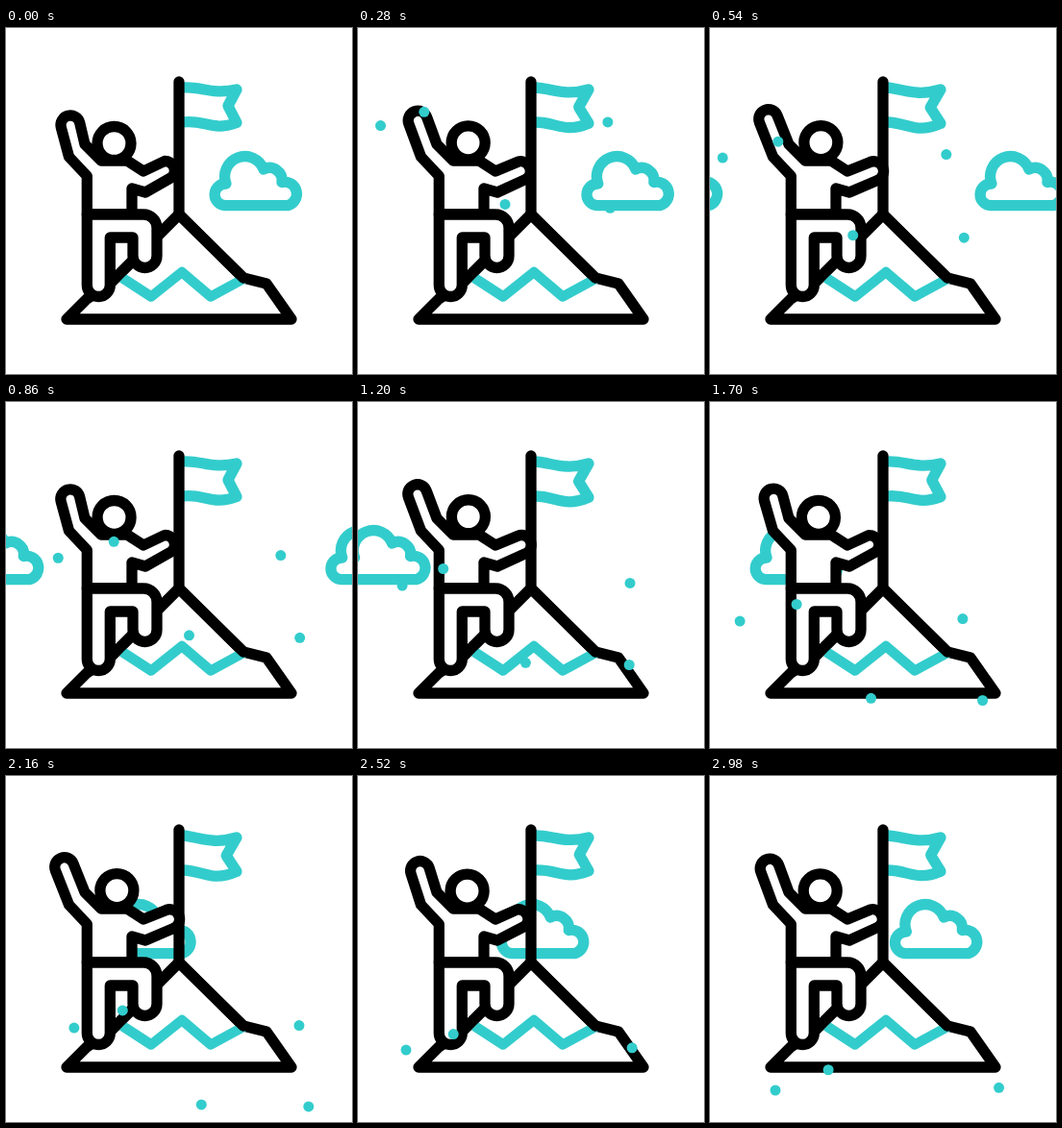
An HTML page that plays this animation: 360x360 px, repeating every 3 s.

```html
<!DOCTYPE html>
<html lang="en">
<head>
<meta charset="utf-8">
<title>Summit</title>
<style>
  html, body { margin: 0; width: 100%; height: 100%; overflow: hidden; background: #fff; }
  svg { display: block; width: 100%; height: 100%; }
  g { stroke-width: 11.3; stroke-linecap: round; stroke-linejoin: round; }
  .teal { fill: none; stroke: #33cccc; }
  .ink { fill: #fff; stroke: #000; }
  #dots { fill: #33cccc; }
</style>
</head>
<body>
<svg viewBox="0 0 360 360">
  <defs>
    <path id="cloud" d="M228 184.7A11.3 11.3 0 0 1 229 162A20.5 20.5 0 0 1 268 147A13 13 0 0 1 287 160.5A12.2 12.2 0 0 1 293 184.7Z"/>
  </defs>
  <g class="teal">
    <use id="leaving" href="#cloud"/>
    <use id="coming" href="#cloud"/>
    <path id="flag"/>
  </g>
  <g class="ink">
    <path d="M63 303H297L271 266L247 260L180 194L108 266L84 282Z"/>
    <path d="M180 56V194"/>
  </g>
  <g class="teal">
    <path stroke-width="10.5" stroke-linecap="butt" d="M121 260L151 279.5L183 254L213 279.5L247 261"/>
  </g>
  <g class="ink">
    <path d="M108 266L180 194L247 260" fill="none"/>
    <circle id="head" r="17.5"/>
    <path id="body"/>
    <path d="M84.3 194V267.5a12 12 0 0 0 24 0V218H132V237a12.5 12.5 0 0 0 25 0V208a14 14 0 0 0-14-14Z"/>
  </g>
  <g id="dots"></g>
</svg>
<script>
  const LOOP = 3000, SWING = 450;
  const $ = id => document.getElementById(id);
  const set = (el, attrs) => { for (const k in attrs) el.setAttribute(k, attrs[k]); };
  const smooth = p => { p = Math.min(1, Math.max(0, p)); return p * p * (3 - 2 * p); };
  const linear = p => Math.min(1, p);

  // Value at time t along [time, value] keys
  function track(keys, t, ease) {
    let i = 0;
    while (i < keys.length - 2 && t > keys[i + 1][0]) i++;
    const [t0, a] = keys[i], [t1, b] = keys[i + 1];
    return a + (b - a) * ease((t - t0) / (t1 - t0));
  }

  const swayX = [[0, 42], [400, 10], [950, 64], [1410, 16], [2080, 71], [2590, 46], [3030, 72]];
  const fallY = [[0, 73], [480, 135], [1140, 191], [2100, 262], [2460, 285], [2920, 327], [3000, 328]];

  // Each dot: x offset, y offset, delay
  const dots = [[0, 0, 60], [52, -22, 0], [133, 78, 30], [234, -1, 80], [245.5, 78, 0]].map(([dx, dy, delay]) => {
    const el = document.createElementNS("http://www.w3.org/2000/svg", "circle");
    $("dots").append(el);
    return { el, dx, dy, delay };
  });

  function bodyPath(s) {
    const x = 67 - 7 * s, y = 101 - 7 * s;
    const len = Math.hypot(74 - x, 128 - y);
    const nx = 10 * (y - 128) / len, ny = 10 * (74 - x) / len;
    return `M84.3 154L65.5 134L${x + nx} ${y + ny}A10 10 0 0 1 ${x - nx} ${y - ny}` +
      `L82 121L99 138H126L143 149L${165 + 2 * s} ${138.5 + s}A10 10 0 0 1 ${173 + s} ${155 + 4 * s}` +
      "L145 171L131 167V194H84.3Z";
  }

  function flagPath(s) {
    return `M184 62C202 ${60 + 4 * s} 214 ${70 + 2 * s} 240 64L${231 - 2 * s} ${81 + 2 * s}L240 ${98.5 + s}` +
      `C214 ${108 + 3 * s} 207 ${95 + 4 * s} 184 98`;
  }

  function draw(now) {
    const t = now % LOOP;
    const phase = t / SWING % 2;
    const s = smooth(phase < 1 ? phase : 2 - phase);

    set($("leaving"), { x: 150 * smooth(t / 1200) });
    set($("coming"), { x: 314 * (smooth(t / 3600) - 1) });
    set($("flag"), { d: flagPath(s) });
    set($("head"), { cx: 112.5 + 3.2 * s, cy: 120 - s });
    set($("body"), { d: bodyPath(s) });

    for (const { el, dx, dy, delay } of dots) {
      const age = t - delay;
      set(el, {
        cx: dx + track(swayX, age, smooth),
        cy: dy + track(fallY, age, linear),
        r: 5.5 * smooth(age / 200)
      });
    }
  }

  const start = performance.now();
  (function frame() {
    draw(performance.now() - start);
    requestAnimationFrame(frame);
  })();
</script>
</body>
</html>
```
